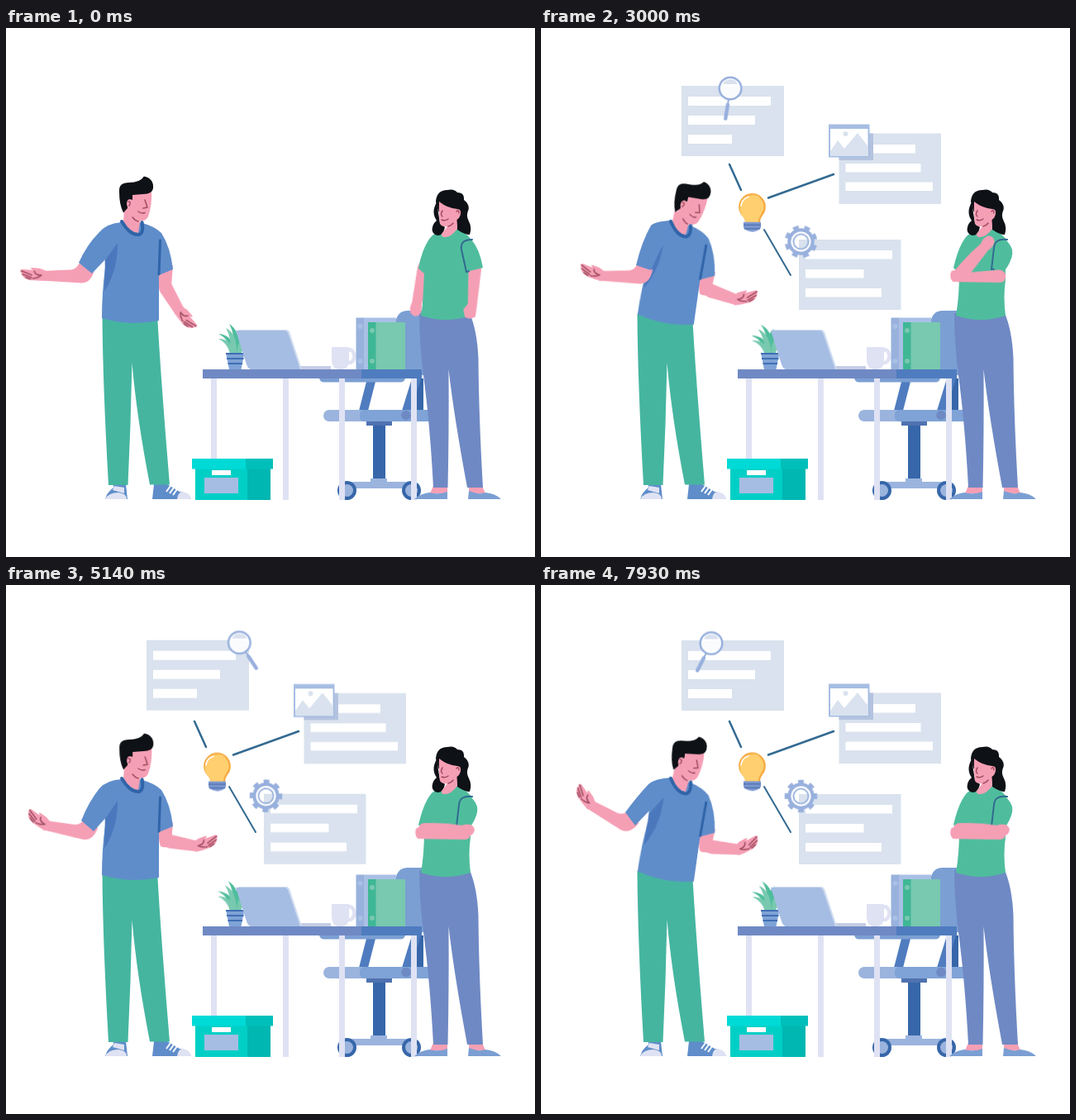
Write an HTML page without scripts that moves like this. It is 640 px wide and 640 px high and loops after 8000 ms.

```html
<!DOCTYPE html>
<html lang="en">
<head>
<meta charset="utf-8">
<title>Sharing an idea</title>
<style>
html, body { margin: 0; width: 100%; height: 100%; overflow: hidden; background: #fff; }
svg { display: block; width: 100%; height: 100%; }
.skin { fill: #f59fb5; }
.hair { fill: #0e1116; }
.ink { fill: none; stroke: #a04c60; stroke-width: 1.5; stroke-linecap: round; stroke-linejoin: round; }
.shirt { fill: #5f8dca; }
.seam { fill: none; stroke: #2f64a8; stroke-linecap: round; }
.top { fill: #4fbd9d; }
.pale { fill: #dfe2f3; }
.card { fill: #d9e2ee; }
.white { fill: #fff; }
.steel { fill: #9bb4de; }
.navy { fill: #3767aa; }
.link { stroke: #336a91; stroke-width: 2.5; stroke-linecap: round; stroke-dasharray: 1 2; }
.ring { fill: none; stroke: #98b0dd; }

/* every part shares one 8 s loop */
.lean, .head, .sleeve, .armL, .handL, .armR, .handR, .herHead, .herArm, .herArm2,
.herSleeve, .herCuff, .leaves, .bulb, .link, .grow, .float, .lens, .grip, .gear {
  animation: 8s ease-in-out infinite;
}
.lean { animation-name: lean; transform-origin: 150px 355px; }
.head { animation-name: head; transform-origin: 155px 240px; }
.sleeve { animation-name: sleeve; }
.armL { animation-name: armL; }
.handL { animation-name: handL; }
.armR { animation-name: armR; }
.handR { animation-name: handR; }
.herHead { animation-name: herHead; transform-origin: 537px 248px; }
.herArm { animation-name: herArm; }
.herArm2 { animation-name: herArm2; }
.herSleeve { animation-name: herSleeve; }
.herCuff { animation-name: herCuff; }
.leaves { animation-name: leaves; transform-origin: 277px 396px; }
.bulb { animation-name: bulb; transform-origin: 256px 244px; }
.link { animation-name: link; }
.c1 { animation-name: grow1; transform-origin: 232px 158px; }
.c2 { animation-name: grow2; transform-origin: 349px 162px; }
.c3 { animation-name: grow3; transform-origin: 312px 300.7px; }
.float { animation-name: float; animation-timing-function: linear; }
.lens { animation-name: lens; animation-timing-function: linear; }
.grip { animation-name: grip; animation-timing-function: linear; }
.gear { animation-name: gear; animation-timing-function: linear; }

@keyframes lean {
  0%, 66%, 86.6% { transform: rotate(0deg); }
  10%, 43.75%, 99%, 100% { transform: rotate(8deg); }
  51.75% { transform: rotate(1deg); }
}
/* extra nod on top of the lean */
@keyframes head {
  0%, 10.75%, 66%, 100% { transform: rotate(0deg); }
  18%, 43.75% { transform: rotate(6deg); }
  51.75% { transform: rotate(7deg); }
}
@keyframes sleeve {
  0% { d: path("M140 235 Q122 236 112 248 Q98 262 88 284 L104 297 L122 278 L145 246 Z"); }
  10%, 43.75% { d: path("M157 233 Q138 234 133 239 Q122 258 115 287 L133 293 L145 267 L160 246 Z"); }
  51.75% { d: path("M141 235 Q124 237 117 245 Q103 262 94 284 L107 298 L122 280 L146 246 Z"); }
  66%, 86.6% { d: path("M140 235 Q122 236 113 246 Q100 262 91 285 L106 298 L122 280 L145 246 Z"); }
  99%, 100% { d: path("M157 233 Q138 234 130 241 Q116 256 102 275 L114 291 L132 272 L160 246 Z"); }
}
@keyframes armL {
  0% { transform: translate(94px, 299px) rotate(0deg); }
  10%, 43.75% { transform: translate(122px, 300px) rotate(1deg); }
  51.75% { transform: translate(99px, 298px) rotate(18deg); }
  66%, 86.6% { transform: translate(97px, 299px) rotate(10deg); }
  99%, 100% { transform: translate(103px, 289px) rotate(29deg); }
}
@keyframes handL {
  0% { transform: translate(-50px, 0px) rotate(5deg); }
  10%, 43.75% { transform: translate(-50px, 0px) rotate(21deg); }
  51.75%, 100% { transform: translate(-50px, 0px) rotate(26deg); }
}
@keyframes armR {
  0% { transform: translate(192px, 311px) rotate(60deg); }
  10%, 43.75% { transform: translate(202px, 316px) rotate(20deg); }
  51.75% { transform: translate(196px, 309px) rotate(-1deg); }
  66%, 86.6% { transform: translate(195px, 309px) rotate(11deg); }
  99%, 100% { transform: translate(203px, 316px) rotate(6deg); }
}
@keyframes handR {
  0% { transform: translate(37px, 0px) rotate(-11deg); }
  10%, 43.75%, 99%, 100% { transform: translate(37px, 0px) rotate(-35deg); }
  51.75% { transform: translate(37px, 0px) rotate(-40deg); }
  66%, 86.6% { transform: translate(37px, 0px) rotate(-31deg); }
}
@keyframes herHead {
  0%, 43.75%, 64%, 100% { transform: rotate(0deg); }
  51.75% { transform: rotate(-6deg); }
}
@keyframes herArm {
  0% { transform: translate(507px, 290px) rotate(103deg); }
  10.75%, 33% { transform: translate(507px, 299px) rotate(-65deg); }
  46%, 100% { transform: translate(507px, 296px) rotate(1deg); }
}
@keyframes herArm2 {
  0% { transform: translate(567px, 292px) rotate(93deg); }
  10%, 100% { transform: translate(555px, 300px) rotate(177deg); }
}
@keyframes herSleeve {
  0% { d: path("M564 256 Q549 256 551 268 L557 295 L577 290 Q573 267 563 256 Q560 252 552 248"); }
  10%, 100% { d: path("M564 256 Q549 254 548 266 L545 292 L563 291 Q572 277 570 268 Q567 258 552 248"); }
}
@keyframes herCuff {
  0%, 3.5% { opacity: 1; }
  4.5%, 100% { opacity: 0; }
}
@keyframes leaves {
  0%, 81%, 84% { transform: rotate(0deg); }
  10.75% { transform: rotate(-3deg); }
  37.5% { transform: rotate(-6deg); }
  100% { transform: rotate(-4deg); }
}
@keyframes bulb {
  0%, 1.5% { transform: scale(0); }
  6%, 100% { transform: scale(1); }
}
@keyframes link {
  0%, 4.5% { stroke-dashoffset: 1.1; }
  9%, 100% { stroke-dashoffset: 0; }
}
@keyframes grow1 { 0%, 6.2% { transform: scale(0); } 15.8%, 100% { transform: scale(1); } }
@keyframes grow2 { 0%, 6.6% { transform: scale(0); } 16.2%, 100% { transform: scale(1); } }
@keyframes grow3 { 0%, 7.1% { transform: scale(0); } 17%, 100% { transform: scale(1); } }
@keyframes float {
  0%, 18% { transform: translateY(0); }
  37.5% { transform: translateY(calc(var(--way) * 2px)); }
  51.75% { transform: translateY(calc(var(--way) * 4px)); }
  66% { transform: translateY(calc(var(--way) * 5.5px)); }
  82% { transform: translateY(calc(var(--way) * 6px)); }
  100% { transform: translateY(calc(var(--way) * 5px)); }
}
@keyframes lens {
  0%, 10.75% { transform: translate(181px, 78px); }
  19.6% { transform: translate(189px, 77px); }
  37.5% { transform: translate(229px, 75px); }
  51.75% { transform: translate(265px, 75px); animation-timing-function: ease-out; }
  66.5% { transform: translate(283px, 75px); animation-timing-function: ease-in; }
  81.25% { transform: translate(262px, 75px); }
  99.1%, 100% { transform: translate(206px, 75.5px); }
}
@keyframes grip {
  0%, 19.6% { transform: rotate(40deg); }
  37.5% { transform: rotate(9deg); }
  51.75% { transform: rotate(-19deg); animation-timing-function: ease-out; }
  66.5% { transform: rotate(-34deg); animation-timing-function: ease-in; }
  81.25% { transform: rotate(-17deg); }
  99.1%, 100% { transform: rotate(27deg); }
}
@keyframes gear { from { transform: rotate(9deg); } to { transform: rotate(261deg); } }
</style>
</head>
<body>
<svg viewBox="0 0 640 640">
  <defs>
    <g id="hand">
      <path class="skin" d="M4 -5.5 L-4 -8 L-13 -8 Q-17 -7 -12 -5 L-25 -5 Q-28 -4 -26 -1 Q-25 4 -17 7 Q-8 8 4 6 Z"/>
      <path class="ink" d="M-26 -3 L-13 1 M-24 1 L-13 4 M-20 4.500 L-14 6 M-10 -4 Q-9 1 -1 0 M-11 5 Q-5 4 -1 0"/>
    </g>
    <g id="wheel">
      <circle class="navy" r="11.5"/>
      <circle class="steel" r="7.5"/>
    </g>
  </defs>

  <!-- chair -->
  <path fill="#7b9fd3" d="M471 362 C471 347 477 342 487 342 H506 V420 H471 Z"/>
  <rect class="navy" x="497" y="424" width="8" height="40"/>
  <path fill="#4f7cbf" d="M437 424 H448 L438 463 H427 Z M491 424 H502 L490 463 H479 Z"/>
  <rect fill="#7b9fd3" x="379" y="417" width="104" height="11.5" rx="5.5"/>
  <rect class="steel" x="384" y="462" width="70" height="14" rx="7"/>
  <rect fill="#7fa3d6" x="428" y="462" width="88" height="14" rx="5"/>
  <circle fill="#6f89c4" cx="484" cy="468.5" r="5.8"/>
  <rect class="navy" x="444" y="478" width="15" height="68"/>
  <rect fill="#4f72b0" x="436" y="476" width="31" height="5"/>
  <path class="steel" d="M441 545 H461 V549 H490 V557 H414 V549 H441 Z"/>
  <use href="#wheel" x="412.5" y="559.5"/>
  <use href="#wheel" x="490.5" y="559.5"/>

  <!-- desk -->
  <path class="pale" d="M248 424 h7 V571 h-7 Z M335 424 h7 V571 h-7 Z M403 424 h7 V571 h-7 Z M490 424 h7 V571 h-7 Z"/>
  <rect fill="#6f89c4" x="238" y="413" width="193" height="11"/>
  <rect fill="#4f7cbf" x="430" y="413" width="73" height="11"/>

  <!-- storage box -->
  <rect fill="#00cfc6" x="229" y="533" width="64" height="38"/>
  <rect fill="#00b7b1" x="292" y="533" width="28" height="38"/>
  <rect fill="#00dad6" x="225" y="521" width="66" height="12.5"/>
  <rect fill="#00bfba" x="290" y="521" width="33" height="12.5"/>
  <rect class="white" x="249" y="535" width="23" height="6"/>
  <rect fill="#a6bde3" x="240" y="544" width="41" height="19"/>

  <!-- plant -->
  <g class="leaves">
    <path class="top" d="M273 394 Q270 376 257 370 Q275 371 278 394 Z M276 394 Q274 370 285 365 Q290 382 281 394 Z M276 394 Q277 370 270 358 Q284 366 282 394 Z"/>
    <path fill="#78c9af" d="M271 394 Q268 381 257 376 Q273 376 277 394 Z M279 394 Q280 379 288 374 Q290 386 284 394 Z M272 394 Q273 374 266 363 Q280 370 279 394 Z"/>
  </g>
  <path fill="#7fa3d6" d="M266 393 H288.5 L284.5 413 H270 Z"/>
  <path stroke="#3f6fb5" stroke-width="2" d="M266 394 H288.5 M267 400 H287.5 M268.5 406 H286"/>

  <!-- laptop, cup, binders -->
  <path fill="#cfdcf0" d="M281 365 H339 Q342 365 343.5 369 L358 413 H300 Z"/>
  <path fill="#a6bde3" d="M278 366 H337 Q340 366 341.5 370 L356 413 H297 Q293 413 291 407 Z"/>
  <rect fill="#c5cee6" x="357" y="409" width="36" height="4"/>
  <ellipse cx="415" cy="397" rx="6.5" ry="8" fill="none" stroke="#dfe2f3" stroke-width="4.5"/>
  <path class="pale" d="M394 386 H415 V401 Q415 413 406 413 H402 Q394 412 394 401 Z"/>
  <rect fill="#a9c0e5" x="432" y="350.5" width="40" height="62.5"/>
  <rect fill="#98b2dd" x="423.5" y="350.5" width="9.5" height="62.5"/>
  <rect fill="#3fb795" x="438" y="356" width="10" height="57"/>
  <rect fill="#78c9af" x="447.5" y="356" width="35.5" height="57"/>
  <g fill="#a9c0e5"><circle cx="428.5" cy="361" r="3"/><circle cx="428.5" cy="403" r="3"/></g>
  <g fill="#78c9af"><circle cx="443" cy="366" r="3"/><circle cx="443" cy="403" r="3"/></g>

  <!-- woman -->
  <path class="skin" d="M517 554 H534 V563 H513 Z M560 554 H576 L580 563 H560 Z"/>
  <path fill="#7b9fd3" d="M494 570 Q502 563 512 562 Q524 565 534 561 V570 Z M559 570 L560 560 Q572 565 580 562 Q592 563 599 570 Z"/>
  <path fill="#6f89c4" d="M500 345 H561 Q570 366 571.5 400 Q572 470 577 556 H558 Q542 470 535.5 413 Q536 490 534.5 556 H517 Q513 480 505 420 Q500 380 500 345 Z"/>
  <path class="top" d="M522 247 Q508 252 499 290 L506 297 Q506 325 502 348 Q532 358 562 348 Q559 325 562 305 L562 255 Q556 247 544 242 Z"/>
  <g class="herHead">
    <path class="hair" d="M520 210 Q521 196 534 196 Q542 194 546 199 Q555 199 554 208 Q561 213 559.5 220 Q556 227 560 234 Q564 241 561 250 Q555 250 546 244 L544 224 L523 222 Z"/>
    <path class="hair" d="M521 211 L525 236 L531 241 Q529 251 522 251 Q514 249 516 241 Q517 236 521 233 Q514 223 521 211 Z"/>
    <path class="skin" d="M524 210 Q534 218 546 219 Q551 219 550 225 Q549 230 545.5 232 L546 243 Q538 254 529 253 Q526 251 527 249 L534 240 Q528 241 525 237 Q523 224 524 210 Z"/>
    <path class="ink" d="M528 221 Q525 226 528 228 M527 232 Q531 234 535 231 M545 222 Q548 219 548 224 M535 240 Q539 239 541 236"/>
  </g>
  <g class="herArm2">
    <path class="skin" d="M0 -8 L44 -5 L57 -4 Q62 2 58 9 L49 11 L42 6 L0 7.5 Q-8 6 -7 -2 Q-6 -8 0 -8 Z"/>
  </g>
  <path class="herSleeve top" d="M564 256 Q549 256 551 268 L557 295 L577 290 Q573 267 563 256 Q560 252 552 248"/>
  <path class="herSleeve seam" style="stroke:#336a91" stroke-width="2" pathLength="100" stroke-dasharray="43 200" d="M564 256 Q549 256 551 268 L557 295 L577 290 Q573 267 563 256 Q560 252 552 248"/>
  <g class="herArm">
    <path class="skin" d="M0 -8 Q24 -9 44 -6 Q52 -9 57 -6 Q62 -2 58 4 Q54 8 44 6 L2 9 Q-8 9 -8 0 Q-8 -8 0 -8 Z"/>
  </g>
  <path class="herCuff top" d="M513 254 Q503 268 499 291 L506 297 L504 335 H520 V260 Z"/>

  <!-- man -->
  <path class="shirt" d="M120 570 Q122 562 130 556 V552 H145 L147 570 Z M177 570 L179 552 H195 L210 561 Q222 562 224 570 Z"/>
  <path class="pale" d="M120 570 Q124 562 136 562 Q146 563 146 570 Z M207 570 Q208 562 213 561 Q222 562 224 570 Z M131 554 L143 556 V563 L129 559 Z"/>
  <path stroke="#fff" stroke-width="2" d="M194 561 L199 554 M198 563 L203 556 M202 565 L207 558"/>
  <path fill="#45b5a0" d="M116.5 346 H183 Q187 420 198 552.5 H174 Q158 470 152.5 405 Q151 480 147.5 553 H124 Q117 430 116.5 346 Z"/>
  <g class="armR">
    <path class="skin" d="M0 -8 L38 -6 V6.5 L4 9 Q-8 8 -8 0 Q-8 -7 0 -8 Z"/>
    <g class="handR"><use href="#hand" transform="scale(-1 1)"/></g>
  </g>
  <g class="lean">
    <path class="skin" d="M185 292 L202 287 L200 312 Q194 320 187 316 Q184 310 185 292 Z"/>
    <path class="shirt" d="M140 235 Q126 238 118 246 L120 290 Q116 320 116 351 Q150 361 185 354 L185 299 L202 292 Q199 265 188 248 Q180 240 165 236 Z"/>
    <path fill="#4b78bd" d="M135 258 Q136 292 119 319 L120 280 Z"/>
    <path class="seam" stroke-width="3" d="M186.5 257 L185 298"/>
  </g>
  <g class="armL">
    <path class="skin" d="M13 -8 Q10 9 -2 9.5 L-52 6.5 V-5 L-15 -6.5 Q-8 -8 -6 -14 Z"/>
    <g class="handL"><use href="#hand"/></g>
  </g>
  <path class="sleeve shirt" d="M140 235 Q122 236 112 248 Q98 262 88 284 L104 297 L122 278 L145 246 Z"/>
  <g class="lean">
    <path class="skin" d="M143 220 L142 234 Q149 247 160 248 L163 228 Z"/>
    <path class="seam" stroke-width="4" stroke-linecap="butt" d="M140 234 Q150 251 161 250 Q167 248 164.5 235"/>
    <g class="head">
      <path class="skin" d="M146 198 L176 197 Q177 214 172 228 Q169 235 160 233 L144 234 Z"/>
      <path class="hair" d="M137 198 Q136 187 149 187 Q162 187 167 179.5 Q179 182 178 194 Q177 201 166 201 L153 202 L153 208 Q146 206 147 218 L142 223.5 Q137 214 137 198 Z"/>
      <path class="skin" d="M153 208 Q146 205 146 213 Q147 219 152 217 Z"/>
      <path class="ink" d="M168 208 L171 217 L166 218 M160 222 Q164 225 168 223.5 M148 210 Q152 210 149 215 M153 229 Q156 233 160 234"/>
    </g>
  </g>

  <!-- idea -->
  <path class="link" pathLength="1" d="M242 196 L228 165"/>
  <path class="link" pathLength="1" d="M275 205.5 L354 177"/>
  <path class="link" style="stroke-width:2" pathLength="1" d="M270 244 L302 299"/>
  <g class="float" style="--way:.85"><g class="bulb">
    <path fill="#f5a83c" d="M247 233 Q247 229 243 225 A16.3 16.3 0 1 1 268 225 Q265 229 265 233 Z"/>
    <path fill="#ffcf70" d="M247 233 Q247 229 243 225 A16.3 16.3 0 0 1 262 201 Q275 212 266 224 Q263 228 263 233 Z"/>
    <path fill="none" stroke="#fff" stroke-width="1.8" stroke-linecap="round" d="M242 213 Q243 205 251 202.5"/>
    <path fill="#7f9ad2" d="M245 233 H266 V240 Q263 244 256 245 Q248 244 245 240 Z"/>
    <path stroke="#4f72b0" stroke-width="1.5" d="M245 236.5 H266 M246 241 H265"/>
  </g></g>

  <g class="grow c1"><g class="float" style="--way:-1">
    <rect class="card" x="170" y="72" width="124" height="85"/>
    <path class="white" d="M178 85 h100 v11 h-100 Z M178 108 h81 v11 h-81 Z M178 131 h53 v11 h-53 Z"/>
    <g class="lens">
      <g class="grip">
        <path class="ring" stroke-width="2" d="M0 13 V20"/>
        <path class="ring" stroke-width="4.5" stroke-linecap="round" d="M0 20 V37"/>
      </g>
      <circle r="13.3" fill="#fff" fill-opacity=".85"/>
      <path class="card" d="M-9 -5 Q-7 -11 0 -11 Q7 -11 9 -5 Z"/>
      <circle class="ring" r="13.3" stroke-width="2.5"/>
    </g>
  </g></g>

  <g class="grow c2"><g class="float" style="--way:1">
    <rect class="card" x="360.5" y="125.5" width="123.5" height="85.5"/>
    <path class="white" d="M368.5 139 h84.5 v10.5 h-84.5 Z M368.5 162 h91 v10.5 h-91 Z M368.5 184.5 h105.5 v10.5 h-105.5 Z"/>
    <rect fill="#b4c3de" x="360.5" y="125.5" width="41.5" height="32.5"/>
    <rect fill="#a6bde3" x="348" y="114.5" width="49.5" height="40"/>
    <rect class="white" x="350" y="120" width="45.5" height="33"/>
    <path class="card" d="M350 153 V147 L359 134 L367 144 L383 125 L395.5 141 V153 Z"/>
    <circle class="card" cx="368.5" cy="126" r="3"/>
  </g></g>

  <g class="grow c3"><g class="float" style="--way:-1">
    <rect class="card" x="312" y="258" width="123.5" height="85"/>
    <path class="white" d="M320 271 h105 v10.5 h-105 Z M320 294 h70.5 v10.5 h-70.5 Z M320 317 h92 v10.5 h-92 Z"/>
    <g transform="translate(314.5 260.5)"><g class="gear">
      <circle class="ring" r="17.5" stroke-width="4.5" pathLength="16" stroke-dasharray="1 1"/>
      <circle class="ring" r="14" stroke-width="4.5"/>
      <circle r="10.8" fill="none" stroke="#fff" stroke-width="2.6"/>
      <circle class="ring" r="9" stroke-width="1.8"/>
    </g></g>
  </g></g>
</svg>
</body>
</html>
```
